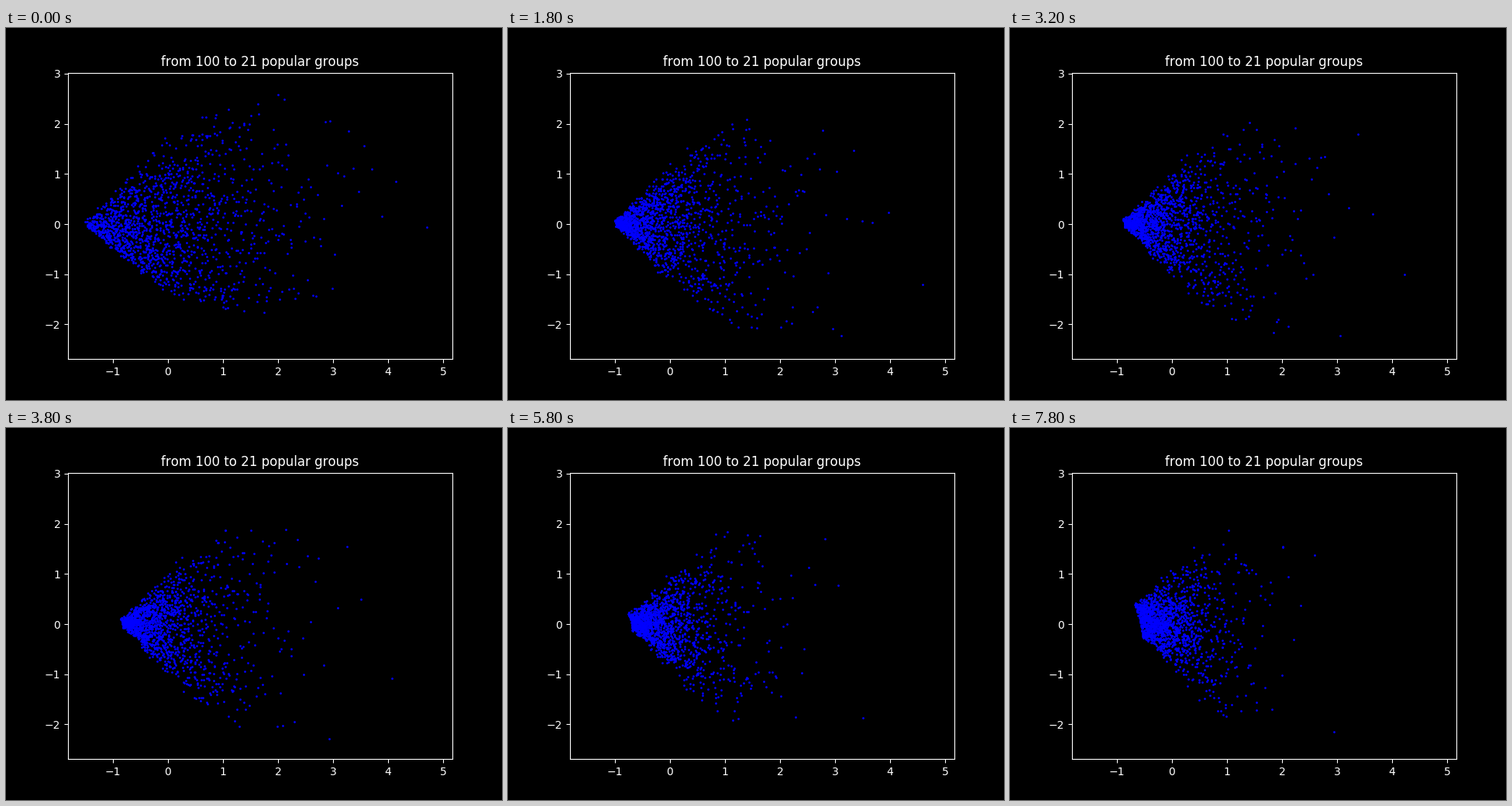
These frames come from a looping animation (640x480 px, 8000 ms). A matplotlib script:

```python
import numpy as np
import matplotlib.pyplot as plt
from matplotlib.animation import FuncAnimation

FRAMES, STEP_MS, COUNT = 40, 200, 1500


def wander(rng, state, chance, keep):
    """Give a random share of the points a partly new latent value."""
    hit = rng.random(COUNT) < chance
    fresh = keep * state + np.sqrt(1 - keep**2) * rng.normal(size=COUNT)
    return np.where(hit, fresh, state)


def build_latents(seed=11):
    """Per frame: how far each point sits from the tip, and to which side."""
    rng = np.random.default_rng(seed)
    size, side, edge = rng.normal(size=(3, COUNT))
    path = []
    for _ in range(FRAMES):
        rank = size.argsort().argsort()
        weight = -np.log(1 - (rank + 0.5) / COUNT)
        path.append((weight / weight.max(), np.tanh(0.62 * side)))
        size = wander(rng, size, 0.15, 0.985)
        side = wander(rng, side, 0.2, 0.93)
    return path, np.tanh(edge)


def cloud(i):
    t = i / (FRAMES - 1)
    settle = np.exp(-t / 0.12)      # early skew that soon dies away
    blunt = 0.06 + 0.29 * t**3      # the tip slowly flattens
    weight, side = latents[i]

    u = (6.2 - 2.65 * t) * weight ** (0.82 - 0.19 * settle)
    side = side - 0.35 * settle**2 * np.exp(-u / 4) * (1 - side**2)
    fan = (1.28 - 0.1 * settle) * np.exp(-((u / 4.5) ** 2))
    tilt = 0.13 * settle**2 - 0.08 * t

    x = u - u.mean() - 0.22 * blunt * edge
    y = u * (tilt + fan * side) + blunt * (edge + 0.2)
    return x, y


def update(i):
    dots.set_data(*cloud(i))
    return (dots,)


latents, edge = build_latents()

plt.style.use("dark_background")
plt.rcParams["text.kerning_factor"] = 6
fig, ax = plt.subplots(figsize=(6.4, 4.8), dpi=100)
(dots,) = ax.plot([], [], ".", color="blue", markersize=2)
ax.set_xlim(-1.815, 5.168)
ax.set_ylim(-2.691, 3.019)
ax.set_title("from 100 to 21 popular groups")

anim = FuncAnimation(fig, update, frames=FRAMES, interval=STEP_MS,
                     init_func=lambda: update(0), repeat=True, repeat_delay=0)
plt.show()
```
